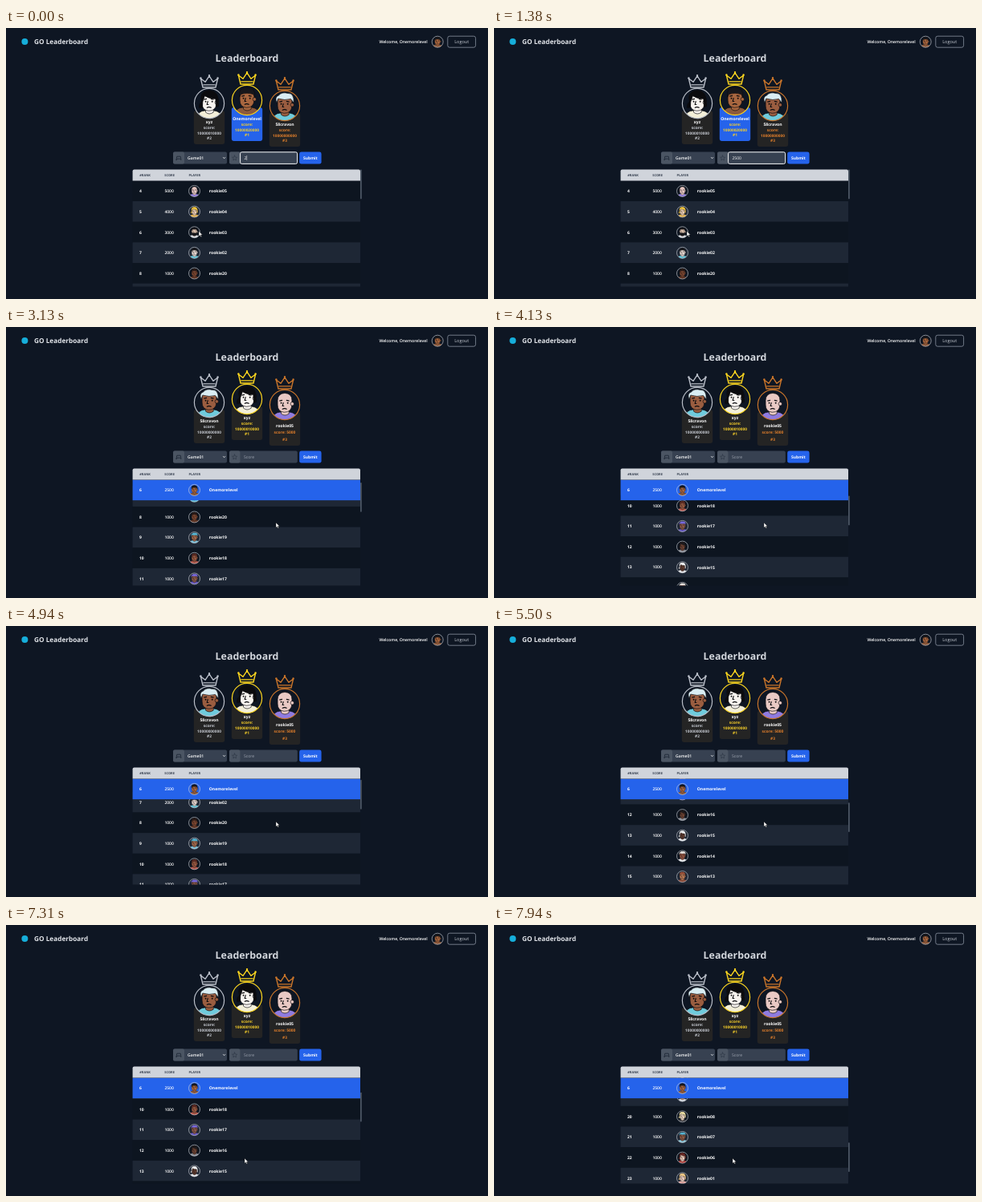
Write an HTML page that moves like this. It is 600 by 338 pixels and loops after 8000 ms.

```html
<!DOCTYPE html>
<html lang="en">
<head>
<meta charset="utf-8">
<title>Leaderboard</title>
<style>
  html, body { margin: 0; width: 100%; height: 100%; overflow: hidden; background: #0e1623; }
  svg { display: block; width: 100vw; height: 100vh; }
  text { font-family: "Open Sans", "Noto Sans", sans-serif; text-rendering: geometricPrecision; white-space: pre; }
</style>
</head>
<body>
<svg id="stage" viewBox="0 0 600 338"></svg>
<script>
const LOOP = 8000, SUBMIT_AT = 1750;
const ROW = 25.65, TABLE_TOP = 176.5, BODY_TOP = 190.4, TABLE_END = 322.4;
const CONTENT = 578, VIEW = TABLE_END - TABLE_TOP;
const USER = 'Onemorelevel', BLUE = '#2563eb', PAGE = '#0e1623';

// skin, hair, shirt, hair style
const LOOKS = {
  [USER]: ['#a8663f', '#17171b', '#8d5a3c', 'flat'],
  xyz: ['#f7f3ef', '#0b0b0e', '#f3efd9', 'bob'],
  '58cravon': ['#9a5d40', '#d9edf3', '#6fcbdc', 'quiff'],
  rookie05: ['#e9c9c4', 'none', '#8f7be0', 'bald'],
  rookie04: ['#f1d2b8', '#eec33f', '#e9b64b', 'bob'],
  rookie03: ['#eed0bb', '#17171b', '#d9dce2', 'beard'],
  rookie02: ['#e8d9d3', '#17171b', '#5fc3d8', 'flat'],
  rookie20: ['#7c4731', '#2b1b17', '#5f3524', 'flat'],
  rookie19: ['#a56a4c', '#58bcdc', '#7cc3dd', 'quiff'],
  rookie18: ['#9a5a42', '#5c2a22', '#b9584c', 'flat'],
  rookie17: ['#8d5a4a', '#7a6be0', '#6658c4', 'quiff'],
  rookie16: ['#6e4434', '#1e1a1c', '#8c8f98', 'bob'],
  rookie15: ['#5e3a2e', '#f0f1f3', '#e6e8ec', 'bob'],
  rookie14: ['#935440', '#e8e3df', '#eceef0', 'quiff'],
  rookie13: ['#b97a56', '#a2533a', '#8d4a38', 'flat'],
  rookie08: ['#f0d9c2', '#e9dba0', '#3c3d42', 'bob'],
  rookie07: ['#8f5b46', '#56b5d4', '#8bc6da', 'quiff'],
  rookie06: ['#f0cdbd', '#6b2823', '#b23d39', 'bob'],
  rookie01: ['#f3d3c6', '#efc987', '#e7a8a4', 'bob']
};
const PLAIN_LOOK = ['#c98f6b', '#2b1b17', '#d9dce2', 'flat'];
const HAIR = {
  flat: 'M-5-2Q-6-8-1-8.4Q6-9 5.4-2L4-4Q0-5.4-4-4Z',
  quiff: 'M-5.4-2Q-7-6-4-7Q-2-9.4 2-8.4Q6.4-8.6 6-2L4-4.6Q0-3.4-4.4-4.8Z',
  bob: 'M-5.2-1Q-7-8.4 0-8.8Q7-8.8 6.2 2L4.6 2.4L4.2-3Q0-3-3-5L-4.4-1L-4.6 3L-6.6 3Q-7 0-5.2-1Z',
  beard: 'M-4.8-3Q-6-8.4 0-8.6Q6-8.4 4.8-3L3-5H-3ZM-4.8 0Q-2 2 0 1.2Q2 2 4.8 0Q5 6.4 0 6.6Q-5 6.4-4.8 0Z',
  bald: ''
};

const rect = (x, y, w, h, fill, rx = 0, extra = '') =>
  `<rect x="${x}" y="${y}" width="${w}" height="${h}" fill="${fill}" rx="${rx}" ${extra}/>`;
const line = (d, stroke, width = 1, fill = 'none') =>
  `<path d="${d}" fill="${fill}" stroke="${stroke}" stroke-width="${width}" stroke-linejoin="round" stroke-linecap="round"/>`;
// y is the middle of the capitals
const label = (x, y, str, size, fill = '#fff', weight = 700, anchor = 'start') =>
  `<text x="${x}" y="${y + size * 0.36}" font-size="${size}" fill="${fill}" font-weight="${weight}" text-anchor="${anchor}">${str}</text>`;

function avatar(x, y, r, name, ring, ringWidth, back = 'none') {
  const [skin, hair, shirt, style] = LOOKS[name] || PLAIN_LOOK;
  return `<g transform="translate(${x} ${y}) scale(${r / 10})">
    <circle r="10" fill="${back}"/>
    <g clip-path="url(#disc)" stroke="#0b0b0e" stroke-width=".35">
      <path d="M-9 11Q-8 5-2.6 4.8L3 4.8Q8.4 5.4 9 11Z" fill="${shirt}"/>
      <path d="M-2.4 2V6Q0 8 2.8 6V2Z" fill="${skin}"/>
      <path d="M-4.8-3Q-4.6-7.6 0-7.8Q4.8-7.6 4.8-3V0Q4.6 5-.4 5Q-4.8 4.6-4.8 0Z" fill="${skin}"/>
      <circle cx="5" cy="-.6" r="1.2" fill="${skin}"/>
      <path d="${HAIR[style]}" fill="${hair}"/>
      <path d="M-3.6-2.6L-1.6-3M1-3L3-2.6M-.9-1.6L-1.5.8H-.4M-1.7 3Q-.2 1.9 1.4 3" fill="none" stroke-width=".6"/>
      <circle cx="-2.4" cy="-1.2" r=".35"/><circle cx="2" cy="-1.2" r=".35"/>
    </g>
    <circle r="10" fill="none" stroke="${ring}" stroke-width="${ringWidth * 10 / r}"/>
  </g>`;
}

const PLACES = [
  { x: 300, y: 90, color: '#fbd51f', text: '#f7cf2a', bottom: 141 },
  { x: 253, y: 94, color: '#b9bec8', text: '#c3c7cf', bottom: 145 },
  { x: 347, y: 97, color: '#c9752b', text: '#e07f2c', bottom: 148 }
];

function podium(entries) {
  return entries.map(([name, score], i) => {
    const { x, y, color, text, bottom } = PLACES[i];
    const mine = name === USER, oneLine = score.length < 8;
    const put = (dy, str, size, fill) => label(x, y + dy, str, size, fill, 700, 'middle');
    const crown = `<g transform="translate(${x} ${y - 27.5})">` +
      line('M-8 7.5L-10.6-3.4L-5 .8L0-6.6L5 .8L10.6-3.4L8 7.5ZM-7.2 4.4H7.2', color, 1.4) +
      [[-10.6, -4], [0, -7.4], [10.6, -4]].map(([a, b]) =>
        `<circle cx="${a}" cy="${b}" r="1.2" fill="${color}"/>`).join('') + '</g>';
    return rect(x - 19.2, y + 9, 38.4, bottom - y - 9, mine ? BLUE : '#242424', 3) + crown +
      avatar(x, y, 18.6, name, color, 1.2, PAGE) +
      put(oneLine ? 26.5 : 22.8, name, 5.1, '#fff') +
      (oneLine ? put(34, 'score: ' + score, 4.9, text)
               : put(30.3, 'score:', 4.9, text) + put(37.6, score, 4.75, text)) +
      put(43, '#' + (i + 1), 4.8, text);
  }).join('');
}

function row(rank, name, score, top, fill) {
  const mid = top + ROW / 2 + 0.2;
  return rect(157.6, top, 283.4, ROW + 0.1, fill) +
    label(166, mid, rank, 5) + label(197.4, mid, score, 5, '#fff', 600) +
    avatar(234.5, mid, 7, name, '#d5d9e0', 0.6) + label(252.8, mid, name, 5.1);
}

const crowd = Array.from({ length: 16 }, (_, i) =>
  ['rookie' + (i === 15 ? '01' : String(20 - i).padStart(2, '0')), 1000]);
const low = [['rookie02', 2000], ...crowd];
const before = [['rookie05', 5000], ['rookie04', 4000], ['rookie03', 3000], ...low];
const after = [['rookie04', 4000], ['rookie03', 3000], [USER, 2500], ...low];

const rows = list => list.map(([name, score], i) => name === USER ? '' :
  row(i + 4, name, score, BODY_TOP + i * ROW, i % 2 ? '#1e2735' : '#0d1520')).join('');

const form =
  rect(208, 154.6, 67, 15, '#374151', 2) + rect(208, 154.6, 14, 15, '#4b5563', 2) +
  line('M212 164.6L212.8 160.2H217.2L218 164.6L216.4 163.2H213.6Z', '#1f2937', 0.9) +
  label(226, 162, 'Game01', 5.1, '#fff', 600) + line('M270.4 161.4L271.6 162.8L272.8 161.4', '#fff', 0.7) +
  rect(278, 154.6, 84.8, 15, '#374151', 2) + rect(278, 154.6, 13.4, 15, '#4b5563', 2) +
  line('M284.6 159L285.5 161.1L287.7 161.3L286 162.8L286.5 165L284.6 163.8L282.7 165L283.2 162.8L281.5 161.3L283.7 161.1Z', '#2b3543', 0.6) +
  rect(365.2, 154.6, 27.4, 15, BLUE, 2.4) + label(378.9, 162.1, 'Submit', 5, '#fff', 700, 'middle');

document.getElementById('stage').innerHTML = `
  <defs>
    <clipPath id="disc"><circle r="10"/></clipPath>
    <clipPath id="body">${rect(150, BODY_TOP, 300, TABLE_END - BODY_TOP, '#000')}</clipPath>
  </defs>
  ${rect(0, 0, 600, 338, PAGE)}
  <circle cx="23.4" cy="17" r="4" fill="#16aeda"/>
  ${label(35, 17.4, 'GO Leaderboard', 8.25, '#e2e5ea')}
  ${label(464.4, 17.3, 'Welcome, ' + USER, 5.15, '#fff', 600)}
  ${avatar(537.2, 17.2, 7, USER, '#d5d9e0', 0.6)}
  ${rect(549.8, 10.2, 34.8, 14, 'none', 2.4, 'stroke="#8b93a1" stroke-width=".8"')}
  ${label(567.2, 17.3, 'Logout', 5.6, '#c4c9d1', 400, 'middle')}
  ${label(300, 37.6, 'Leaderboard', 12.4, '#d3d7dd', 700, 'middle')}
  <g id="podiumBefore">${podium([[USER, '10000020000'], ['xyz', '10000010000'], ['58cravon', '10000000000']])}</g>
  <g id="podiumAfter">${podium([['xyz', '10000010000'], ['58cravon', '10000000000'], ['rookie05', '5000']])}</g>
  ${form}
  <g id="focus">
    ${rect(291.6, 154.8, 71, 14.6, 'none', 2, 'stroke="#f3f4f6" stroke-width="1"')}
    <g id="typed">${label(296.4, 162.1, '', 5.05, '#fff', 400)}</g>
    <path id="caret" d="M0 159V165" stroke="#fff" stroke-width=".5"/>
  </g>
  <g id="placeholder">${label(296, 162, 'Score', 5.1, '#9ca3af', 400)}</g>
  <g clip-path="url(#body)">
    <g id="rowsBefore">${rows(before)}</g>
    <g id="rowsAfter">${rows(after)}</g>
    <g id="mine">${row(6, USER, 2500, 0, BLUE)}</g>
  </g>
  <path d="M157.6 ${BODY_TOP}V178.5Q157.6 176.5 159.6 176.5H439Q441 176.5 441 178.5V${BODY_TOP}Z" fill="#d0d4db"/>
  ${label(166.3, 183.6, '#RANK', 3.95, '#374151')}
  ${label(197.3, 183.6, 'SCORE', 3.95, '#374151')}
  ${label(227.6, 183.6, 'PLAYER', 3.95, '#374151')}
  <rect id="thumb" x="441" width="1.8" height="${VIEW * VIEW / CONTENT}" rx=".9" fill="#4b5563"/>
  <path id="cursor" d="M0 0V6.2L1.5 4.9L2.5 7.1L3.5 6.7L2.5 4.5H4.5Z" fill="#fff" stroke="#111" stroke-width=".4"/>`;

const el = id => document.getElementById(id);
const show = (id, on) => el(id).setAttribute('display', on ? 'inline' : 'none');

// [time, scroll offset] and [time, x, y]
const SCROLL = [[2570, 0], [3130, 69], [4130, 135], [4440, 0], [4640, 0], [5500, 173],
  [5600, 176], [6250, 0], [7200, 0], [7310, 127], [7940, 375]];
const POINTER = [[1750, 240, 253.5], [2310, 336, 244], [5950, 336, 244], [6110, 310, 86], [6250, 336, 243],
  [6380, 435, 200], [6480, 380, 88], [6590, 251, 110], [6690, 321, 157], [6970, 321, 157], [7060, 297, 291]];
const TYPING = [[0, '2'], [560, '25'], [750, '250'], [880, '2500']];

function at(keys, t) {
  const next = keys.findIndex(k => k[0] > t);
  if (next === 0) return keys[0].slice(1);
  if (next < 0) return keys[keys.length - 1].slice(1);
  const a = keys[next - 1], b = keys[next], p = (t - a[0]) / (b[0] - a[0]);
  return a.slice(1).map((v, i) => v + (b[i + 1] - v) * p);
}

function draw(t) {
  const done = t >= SUBMIT_AT;
  ['podiumBefore', 'rowsBefore', 'focus'].forEach(id => show(id, !done));
  ['podiumAfter', 'rowsAfter', 'mine', 'placeholder'].forEach(id => show(id, done));

  const [, typed] = TYPING.filter(k => k[0] <= t).pop();
  el('typed').firstElementChild.textContent = typed;
  el('caret').setAttribute('transform', `translate(${296.8 + typed.length * 2.89} 0)`);
  show('caret', t < 130 || (t >= 560 && t < 1380));

  const [scroll] = at(SCROLL, t);
  el('rowsAfter').setAttribute('transform', `translate(0 ${-scroll})`);
  el('mine').setAttribute('transform', `translate(0 ${BODY_TOP + Math.max(0, 2 * ROW - scroll)})`);
  el('thumb').setAttribute('y', TABLE_TOP + scroll * VIEW / CONTENT);
  el('cursor').setAttribute('transform', `translate(${at(POINTER, t).join(' ')})`);
}

const start = performance.now();
function tick() {
  draw(Math.max(0, performance.now() - start) % LOOP);
  requestAnimationFrame(tick);
}
tick();
</script>
</body>
</html>
```
